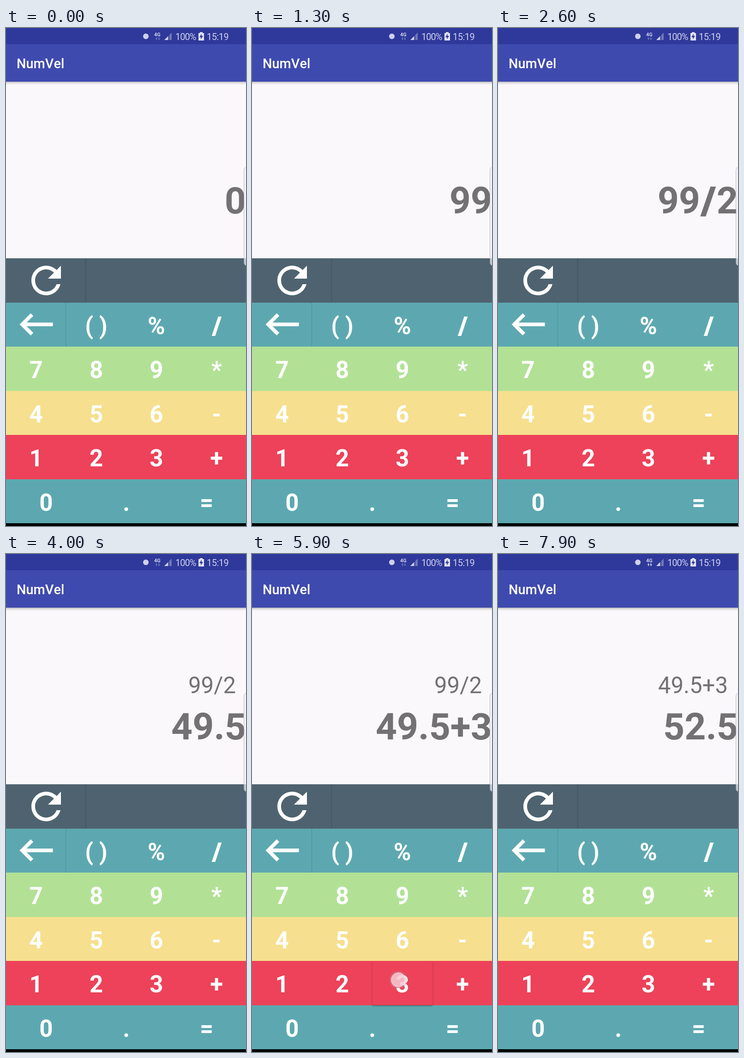
These frames come from a looping animation (520 by 1077 pixels, 8 s). An HTML page:

```html
<!DOCTYPE html>
<html lang="en">
<head>
<meta charset="utf-8">
<title>Calculator</title>
<style>
html, body { margin: 0; width: 100%; height: 100%; overflow: hidden; background: #000 }
svg { display: block; width: 100%; height: 100%; font-family: Roboto, sans-serif }
text { fill: currentColor; font-kerning: none }
.key { font-size: 51px; font-weight: 700; color: #fff; text-anchor: middle; white-space: pre }
.out { color: #737174; text-anchor: end }
.bar { color: #cfd1ea; font-size: 20px; letter-spacing: -1px }
.slash { stroke: currentColor; stroke-width: .04em; letter-spacing: .035em }
</style>
</head>
<body>
<svg viewBox="0 0 520 1077">
  <defs>
    <linearGradient id="drop" x2="0" y2="1">
      <stop stop-color="#000" stop-opacity=".36"/>
      <stop offset=".4" stop-color="#000" stop-opacity=".12"/>
      <stop offset="1" stop-color="#000" stop-opacity="0"/>
    </linearGradient>
    <filter id="soft" x="-20%" y="-20%" width="140%" height="140%"><feGaussianBlur stdDeviation="1.500"/></filter>
  </defs>
  <rect width="520" height="1071" fill="#faf8fb"/>
  <rect y="115" width="520" height="8" fill="url(#drop)"/>
  <rect width="520" height="116" fill="#3f4aaf"/>
  <rect width="520" height="35" fill="#2f399b"/>
  <text x="23" y="87" font-size="28.9" font-weight="500" color="#fff">NumVel</text>

  <circle cx="303" cy="18" r="6" fill="#cfd1ea"/>
  <text class="bar" x="321" y="18" style="font-size:11px;font-weight:700;letter-spacing:0">4G</text>
  <path id="data" d="M326 20l2.500 3h-1.600v3h-1.800v-3h-1.600zM331.500 26l-2.500-3h1.600v-3h1.800v3h1.600z" fill="#cfd1ea"/>
  <path d="M343 26L359 10V26z" fill="#7077b9"/>
  <path d="M343 26l8-8v8z" fill="#cfd1ea"/>
  <path d="M353 9v18" stroke="#2f399b" stroke-width="1.500"/>
  <text class="bar" x="367" y="25.500">100%</text>
  <path d="M420 9h6v2h3v16h-12V11h3z" fill="#e3e4f3"/>
  <path d="M424 12l-5 8h3.500l-.5 5 5-8h-3.500z" fill="#2f399b"/>
  <text class="bar" x="435" y="25.500" style="letter-spacing:-.5px">15:19</text>

  <text id="small" class="out" x="498" y="301" font-size="49.100"></text>
  <text id="big" class="out" x="520" y="401" font-size="80.500" font-weight="700"></text>

  <g id="rows"></g>
  <g id="lift">
    <rect id="shade" y="2" height="95.500" filter="url(#soft)" opacity=".3"/>
    <rect id="face" height="95.500"/>
  </g>
  <g id="keys"></g>
  <g fill="#fff">
    <path transform="translate(39 498) scale(4)" d="M17.650 6.350C16.200 4.900 14.210 4 12 4c-4.420 0-7.990 3.580-7.990 8s3.570 8 7.990 8c3.730 0 6.840-2.550 7.730-6h-2.080c-.82 2.330-3.040 4-5.650 4-3.310 0-6-2.690-6-6s2.690-6 6-6c1.660 0 3.140.69 4.220 1.780L13 11h7V4z"/>
    <path transform="translate(17.500 593) scale(4)" d="M21 11H6.830l3.580-3.590L9 6l-6 6 6 6 1.410-1.410L6.830 13H21z"/>
  </g>
  <path d="M172.500 498v95" stroke="#43545f" stroke-width="1.500"/>
  <path d="M129.500 594v95" stroke="#4f969e" stroke-width="1.500"/>
  <path d="M526 301.500h-5q-5.500 0-5.500 7v198q0 7 5.500 7h5z" fill="#f1f1f5" fill-opacity=".72" stroke="#8e8e94" stroke-opacity=".6"/>
  <g id="touch">
    <circle r="19" fill="#a9a3aa" fill-opacity=".35"/>
    <circle r="15.500" fill="#fbccd6" fill-opacity=".8" stroke="#fff" stroke-opacity=".55"/>
  </g>
</svg>
<script>
const $ = id => document.getElementById(id);
const TOP = 498, ROW = 95.5, WIDTH = 521.4, LOOP = 8000;
const colors = ['#4e636f', '#5da8b0', '#b2e196', '#f6df8e', '#ed4259', '#5da8b0'];
const labels = [[], ['', '( )', '%', '/'], [7, 8, 9, '*'], [4, 5, 6, '-'], [1, 2, 3, '+'], [0, '.', '=']];

const rowTop = r => Math.round(TOP + r * ROW);
const heavy = s => String(s).replace('/', '<tspan class="slash" dx=".035em">/</tspan>');

labels.forEach((row, r) => {
  const w = WIDTH / row.length;
  $('rows').innerHTML += `<rect y="${rowTop(r)}" width="520" height="${rowTop(r + 1) - rowTop(r)}" fill="${colors[r]}"/>`;
  row.forEach((s, c) => {
    $('keys').innerHTML += `<text class="key" x="${(c + .5) * w}" y="${TOP + r * ROW + 68}">${heavy(s)}</text>`;
  });
});

// start time, touch point, main line and upper line after the tap
const taps = [
  [150, 331, 738, '9', ''],
  [550, 331, 738, '99', ''],
  [1450, 462, 640, '99/', ''],
  [2250, 217, 930, '99/2', ''],
  [3350, 440, 1022, '49.5', '99/2'],
  [5150, 472, 926, '49.5+', '99/2'],
  [5650, 317, 921, '49.5+3', '99/2'],
  [6450, 440, 1022, '52.5', '49.5+3']
];
const within = (t, a, b) => t >= a && t < b;
const show = (id, on) => $(id).setAttribute('visibility', on ? 'visible' : 'hidden');

function draw(now) {
  const t = now % LOOP;
  const done = taps.filter(p => t >= p[0] + 200).pop() || [0, 0, 0, '0', ''];
  $('big').innerHTML = heavy(done[3]);
  $('small').textContent = done[4];

  const tap = taps.find(p => within(t, p[0], p[0] + 350));
  show('touch', tap && t < tap[0] + 300);
  show('lift', tap && t >= tap[0] + 100);
  if (tap) {
    const [, x, y] = tap;
    const r = Math.floor((y - TOP) / ROW), w = WIDTH / labels[r].length;
    const left = Math.floor(x / w) * w;
    $('touch').setAttribute('transform', `translate(${x} ${y})`);
    $('lift').setAttribute('transform', `translate(${left} ${rowTop(r)})`);
    $('shade').setAttribute('width', w);
    $('face').setAttribute('width', w);
    $('face').setAttribute('fill', colors[r]);
  }
  const busy = within(t, 4700, 5500) || t >= 7600;
  $('data').setAttribute('opacity', busy ? 1 : .4);
}

const start = performance.now();
(function frame() {
  draw(performance.now() - start);
  requestAnimationFrame(frame);
})();
</script>
</body>
</html>
```
